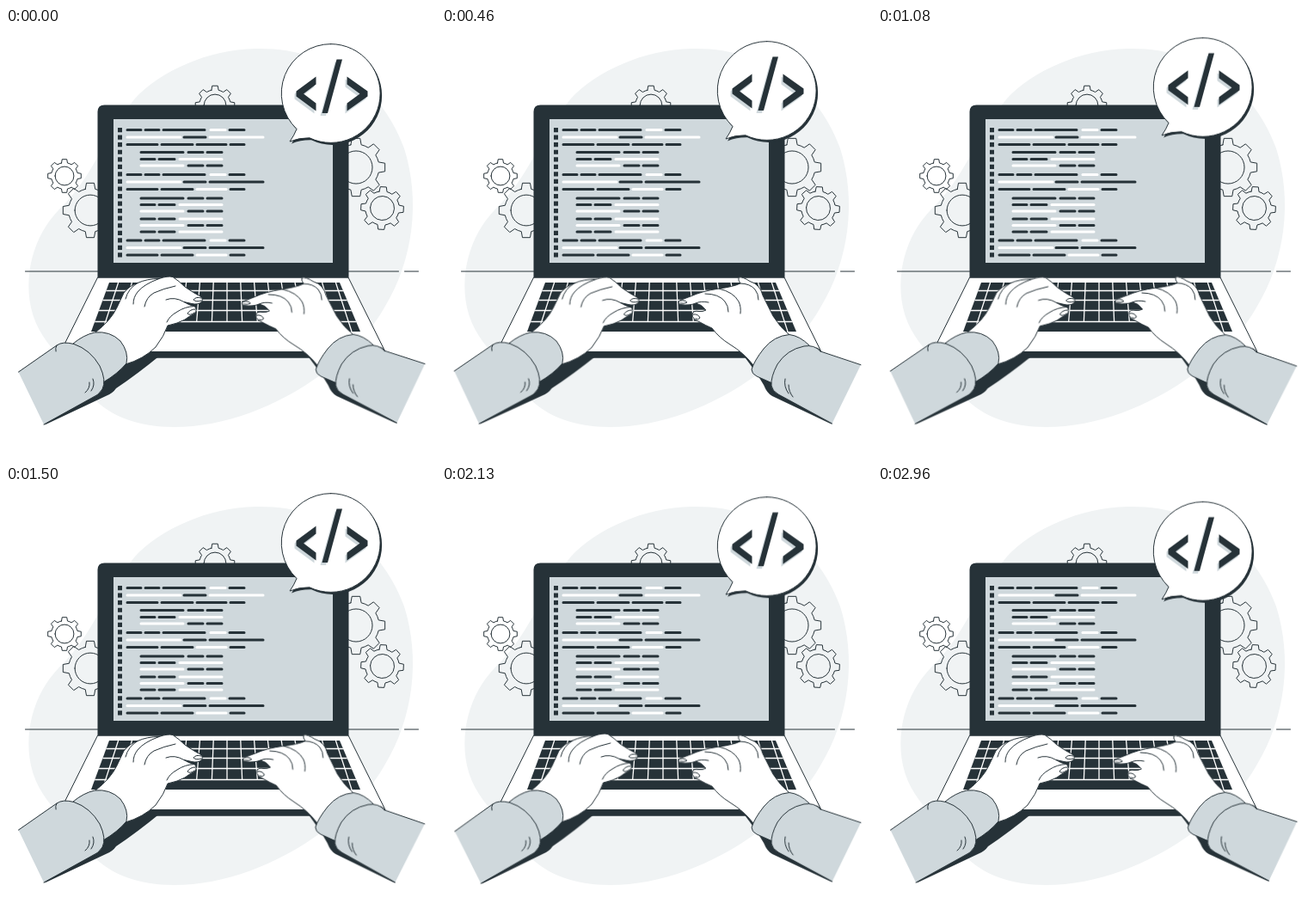
These frames come from a looping animation (500x500 px, 3 s). An HTML page without scripts:

```html
<!DOCTYPE html>
<html lang="en">
<head>
<meta charset="utf-8">
<title>Typing on a laptop</title>
<style>
  html, body { margin: 0; width: 100%; height: 100%; overflow: hidden; background: #fff; }
  svg { display: block; width: 100vw; height: 100vh; }
  .dark { fill: #263238; }
  .grey { fill: #cfd8dc; }
  .line { stroke: #263238; stroke-width: 1; stroke-linejoin: round; stroke-linecap: round; }
  .white { fill: #fff; }
  .open { fill: none; }
  .gear { fill: none; vector-effect: non-scaling-stroke; }
  .code { fill: none; stroke-width: 3; stroke-linecap: round; }
  .ink { stroke: #263238; }
  .pale { stroke: #fff; }
  .keys { fill: none; stroke: #fff; stroke-width: 1.3; }
  .bubble { animation: float 3s linear infinite; }
  .arm { animation: sway 3s linear infinite; }
  .left { transform-origin: 121px 375px; }
  .right { transform-origin: 381px 375px; animation-delay: -2.5s; }
  @keyframes float {
    50% { transform: translateY(-10px); }
  }
  @keyframes sway {
    25% { transform: rotate(1deg); }
    75% { transform: rotate(-1deg); }
  }
</style>
</head>
<body>
<svg viewBox="0 0 500 500">
  <defs>
    <path id="gear" class="gear line" d="M-18-77L-14-99H14L18-77A79 79 0 0 1 41.7-67.2L60.1-79.9L79.9-60.1L67.2-41.7A79 79 0 0 1 77-18L99-14V14L77 18A79 79 0 0 1 67.2 41.7L79.9 60.1L60.1 79.9L41.7 67.2A79 79 0 0 1 18 77L14 99H-14L-18 77A79 79 0 0 1-41.7 67.2L-60.1 79.9L-79.9 60.1L-67.2 41.7A79 79 0 0 1-77 18L-99 14V-14L-77-18A79 79 0 0 1-67.2-41.7L-79.9-60.1L-60.1-79.9L-41.7-67.2A79 79 0 0 1-18-77ZM-56 0A56 56 0 0 0 56 0A56 56 0 0 0-56 0Z"/>

    <!-- code rows -->
    <g id="call" class="code">
      <path class="ink" d="M141 0h16m5 0h16m5 0h48m29 0h17"/>
      <path class="pale" d="M238 0h17"/>
    </g>
    <g id="long" class="code">
      <path class="pale" d="M141 0h62"/>
      <path class="ink" d="M207 0h25m5 0h62"/>
    </g>
    <path id="full" class="code ink" d="M141 0h35m5 0h36m5 0h34m5 0h16"/>
    <path id="wide" class="code ink" d="M157 0h49m6 0h17m5 0h17"/>
    <g id="tailRow" class="code">
      <path class="ink" d="M157 0h16m5 0h18"/>
      <path class="pale" d="M202 0h49"/>
    </g>
    <g id="headRow" class="code">
      <path class="pale" d="M157 0h49"/>
      <path class="ink" d="M212 0h17m5 0h17"/>
    </g>
    <g id="mixed" class="code">
      <path class="ink" d="M141 0h35m5 0h36m44 0h16"/>
      <path class="pale" d="M222 0h34"/>
    </g>

    <path id="tag" d="M360.500 56.500V65.500L346 76.500L360.500 87.500V96.500L337.500 79.500V73.500ZM384.500 36.500H391L374 99H367.500ZM396.500 56.500L420.500 73.500V79.500L396.500 96.500V87.500L411.500 76.500L396.500 65.500Z"/>
    <path id="balloon" d="M377.700 18.600A57.400 57.400 0 1 1 353 127.800Q341 127.500 330 132Q335 125 338 117.500A57.400 57.400 0 0 1 377.700 18.600Z"/>
    <clipPath id="board"><path d="M120 296H388L412 353H99Z"/></clipPath>
  </defs>

  <path fill="#f0f3f4" d="M290 24C380 22 440 75 463 140C482 200 474 270 440 325C420 360 395 380 365 404C315 440 255 464 195 464C155 464 122 452 101 430C85 395 40 375 29 325C20 280 35 235 68 205C105 165 115 125 150 82C180 50 235 25 290 24Z"/>

  <!-- gears -->
  <use href="#gear" transform="translate(243 90) scale(.23)"/>
  <use href="#gear" transform="translate(98 212) scale(.32)"/>
  <use href="#gear" transform="translate(68 172) scale(.195)"/>
  <use href="#gear" transform="translate(407 162) scale(.34)"/>
  <use href="#gear" transform="translate(437.500 209.500) rotate(3) scale(.25)"/>

  <path class="line open" d="M22.500 283H456.500M463.500 283H479.500"/>

  <!-- laptop -->
  <path class="dark" d="M70 376H436V380Q436 383.800 432 383.800H74Q70 383.800 70 380Z"/>
  <path class="white line" d="M107 290H398L441 376.500H64Z"/>
  <path class="dark" d="M106.500 290.500V97.500Q106.500 89.500 114.500 89.500H390.500Q398.500 89.500 398.500 97.500V290.500Z"/>
  <path class="grey" d="M125 106H380V273H125Z"/>
  <g clip-path="url(#board)">
    <path class="dark" d="M95 296H415V353H95Z"/>
    <path class="keys" d="M95 305.500H415M95 316.500H415M95 328.500H415M95 341.500H415"/>
    <path class="keys" d="M257 296V341M272.800 296L274.600 341M288.600 296L292.300 341M304.400 296L309.900 341M320.200 296L327.600 341M336 296L345.200 341M351.800 296L365.800 353M367.600 296L384 353M383.400 296L402 353M241.200 296L239.400 341M225.400 296L221.700 341M209.600 296L204.100 341M193.800 296L186.400 341M178 296L168.800 341M162.200 296L148.200 353M146.400 296L130 353M130.600 296L112 353"/>
  </g>

  <!-- screen -->
  <path d="M132.500 116V266.600" fill="none" class="ink" stroke-width="5" stroke-dasharray="5.200 3.350"/>
  <use href="#call" y="118.500"/>
  <g class="code" transform="translate(0 127)">
    <path class="pale" d="M141 0h62m34 0h62"/>
    <path class="ink" d="M207 0h25"/>
  </g>
  <use href="#full" y="135.500"/>
  <use href="#wide" y="144.500"/>
  <use href="#tailRow" y="152.500"/>
  <use href="#headRow" y="160"/>
  <use href="#call" y="170.500"/>
  <use href="#long" y="179"/>
  <use href="#mixed" y="187.500"/>
  <use href="#wide" y="198"/>
  <use href="#tailRow" y="205.500"/>
  <use href="#headRow" y="213"/>
  <use href="#tailRow" y="222"/>
  <use href="#headRow" y="229.500"/>
  <use href="#tailRow" y="237"/>
  <use href="#call" y="247"/>
  <use href="#long" y="255.500"/>
  <use href="#mixed" y="264"/>

  <!-- left arm -->
  <g class="arm left">
    <path class="dark" d="M44 462L116 428Q124 425 128 419Q152 403 180 380L150 376L100 415Z"/>
    <path class="white line" d="M104 354Q122 340 129 325L137 308Q143 300 153 296.500Q164 291.500 178 291.500Q188 288 194 289.500Q201 294 208 301Q218 308 226 312Q230 315 227 319Q223 322 216 320.500L207 318.500Q212 322 219 323.500Q223 327 219.500 332Q213 335 208 339Q200 343.500 188 346Q184 358 174 371Q160 385 139 391Z"/>
    <path class="line open" d="M153 296.500Q142 303 139 315M178 291.500Q160 298 153 307Q148 313 148 321M197 300Q183 303 172 308Q163 313 161 324M207 318.500Q196 312 186 316M219 323.500Q208 324 199 330Q190 335 187 342M227 314Q221 312 218 316Q221 319 227 317M220 327Q214 327 211 332Q214 335 219 331"/>
    <path class="grey line" d="M78 367Q90 357 103 354Q121 352 133 364Q143 377 140 390Q130 402 113 412Z"/>
    <path class="grey line" d="M14.500 400L59 369Q66 364 79 367.500Q98 374 109 393Q117 410 112 420Q108 427 100 430L44 461"/>
    <path class="line open" d="M59 369Q57 372 58 376M97 412Q98 419 92 424M101 408Q104 415 99 422"/>
  </g>

  <!-- right arm -->
  <g class="arm right">
    <path class="dark" d="M453.500 461L384 428Q378 425 374 415Q366 401 350 380L365 385L400 410Z"/>
    <path class="white line" d="M404 357Q393 348 385 335L373 311Q370 298 358 294.500Q350 289 345 290Q344 293 347 297Q338 301 322 303Q302 306 289 312L277 316.500Q273 319 277 321.500Q288 323 295 320Q302 321 307 328Q303 330 299 329.500Q292 328 291 333Q291 338 298 341Q307 346 314 349Q322 360 335 368Q350 377 362 392Z"/>
    <path class="line open" d="M347 297Q358 297 364 304Q368 309 368 316M322 303Q339 307 345 318Q348 324 347 332M295 320Q301 317 310 319M306 309Q322 309 329 318Q333 323 333 330M277 317Q283 316 285 319Q282 321 277 320"/>
    <path class="line open" d="M292 333Q298 332 300 337Q298 340 295 338"/>
    <path class="grey line" d="M427 369Q416 358 404 356.500Q386 358 374 373Q363 387 360 397Q360 402 366 405L384 413Z"/>
    <path class="grey line" d="M487 391.700L440 376Q433 368 421 370Q401 374 390 391Q382 406 383 416Q384 422 391 426L453.500 460"/>
    <path class="line open" d="M440 376Q440 374 436 372M399 408Q397 417 403 425M403 415Q403 423 408 429"/>
  </g>

  <!-- speech bubble -->
  <g class="bubble">
    <use href="#balloon" class="dark" x="2" y="2.500"/>
    <use href="#balloon" class="white line"/>
    <use href="#tag" class="grey" x="-2" y="3"/>
    <use href="#tag" class="dark"/>
  </g>
</svg>
</body>
</html>
```
